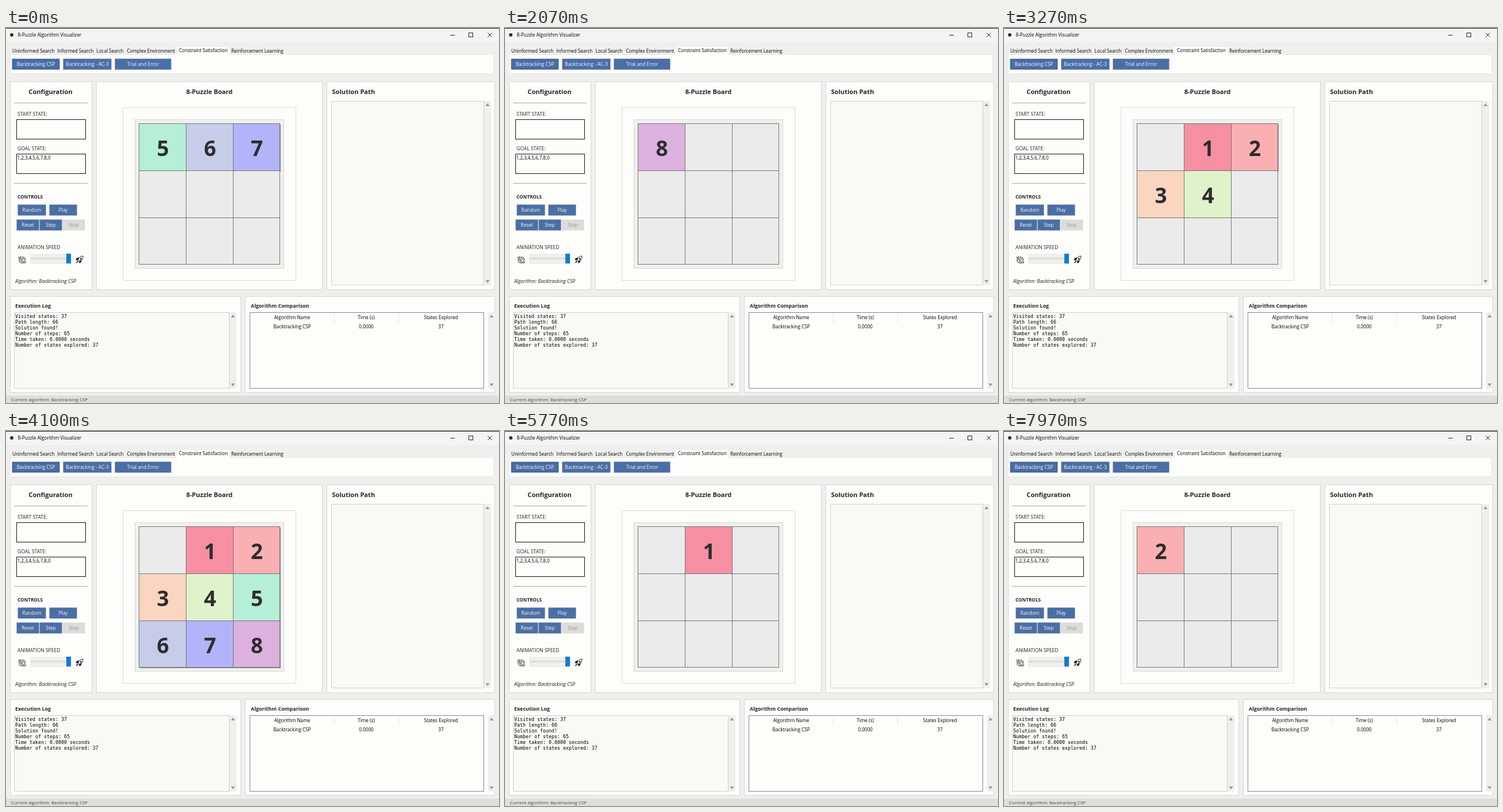
An HTML page with a canvas for the animation above (8 s loop, 858 px wide and 653 px high).

```html
<!DOCTYPE html>
<html lang="en">
<head>
<meta charset="utf-8">
<title>8-Puzzle Algorithm Visualizer</title>
<style>
  html, body { margin: 0; width: 100%; height: 100%; overflow: hidden; background: #efefee; }
  canvas { display: block; }
</style>
</head>
<body>
<canvas id="stage" width="858" height="653"></canvas>
<script>
const ctx = document.getElementById('stage').getContext('2d');
const SANS = '"Open Sans", "Noto Sans", sans-serif';
const MONO = '"DejaVu Sans Mono", monospace';
const BLUE = '#4b6ea4', INK = '#242424', PANEL = '#fdfdfc', EDGE = '#d6d6d0';
const TILE_COLORS = ['', '#f78fa2', '#fab0b3', '#fad6c0', '#e0f2ca', '#b6efd8', '#c7cce9', '#b3b3fa', '#dcb1df'];
const LOOP = 8000;

// Depth-first search: consecutive values are placed, then undone on failure.
function searchStates(starts) {
  const states = [];
  for (const start of starts) {
    const values = [];
    for (let v = start; v <= 8; v++) values.push(v);
    if (start > 0) values.push(0);
    for (let n = 1; n <= values.length; n++) states.push(values.slice(0, n));
    for (let n = values.length - 1; n >= 0; n--) states.push(values.slice(0, n));
  }
  return states;
}

// Every state is held a little longer the more tiles it has to draw.
const states = searchStates([5, 8, 0, 6, 2]).slice(2);
let clock = -90;
const timeline = states.map(values => {
  clock += 185 + 9 * values.filter(Boolean).length;
  return { values, end: clock };
});

function box(x1, y1, x2, y2, fill, stroke) {
  if (fill) { ctx.fillStyle = fill; ctx.fillRect(x1, y1, x2 - x1, y2 - y1); }
  if (stroke) {
    ctx.strokeStyle = stroke;
    ctx.lineWidth = 1;
    ctx.strokeRect(x1 + .5, y1 + .5, x2 - x1 - 1, y2 - y1 - 1);
  }
}

function text(str, x, y, size, { align = 'left', color = '#000', style = '', font = SANS } = {}) {
  ctx.font = `${style} ${size}px ${font}`;
  ctx.textAlign = align;
  ctx.fillStyle = color;
  ctx.fillText(str, x, y);
}

function path(d, color, width = 1, fill) {
  const p = new Path2D(d);
  if (fill) { ctx.fillStyle = fill; ctx.fill(p); }
  if (!color) return;
  ctx.strokeStyle = color;
  ctx.lineWidth = width;
  ctx.stroke(p);
}

function button(label, x1, y1, x2, y2, fill = BLUE, color = '#f8f9fc') {
  box(x1 - .5, y1 - .5, x2 + .5, y2 + .5, fill);
  text(label, (x1 + x2) / 2, (y1 + y2) / 2 + 3, 8.4, { align: 'center', color });
}

function scrollbar(x1, x2, top, bottom) {
  const x = (x1 + x2) / 2;
  box(x1, top, x2, bottom, '#efefee');
  path(`M${x - 3.5} ${top + 9}h7l-3.5 -5z`, null, 0, '#999');
  path(`M${x - 3.5} ${bottom - 9}h7l-3.5 5z`, null, 0, '#999');
}

function drawHeader() {
  box(0, 0, 858, 653, '#efefee');
  box(0, 0, 858, 24, '#f3f4f3');
  box(0, 0, 858, 1, '#1c1c2b');
  path('M13 12a3 3 0 1 1 -6 0a3 3 0 1 1 6 0z', null, 0, '#333');
  text('8-Puzzle Algorithm Visualizer', 20.5, 15, 8.25);
  path('M773 12.5h8', '#222');
  box(805, 8, 813, 16, null, '#222');
  path('M838.5 8.5l7 7m0 -7l-7 7', '#222');

  box(7, 46, 849, 80, PANEL, '#e9e9e6');
  box(297, 33, 389, 47, PANEL);
  [['Uninformed Search', 11], ['Informed Search', 89.5], ['Local Search', 157.5], ['Complex Environment', 210.5],
   ['Constraint Satisfaction', 301, 42], ['Reinforcement Learning', 392]]
    .forEach(([label, x, y = 43]) => text(label, x, y, 8.1));
  button('Backtracking CSP', 11, 54, 93, 72);
  box(12, 55, 92, 71, null, '#3f5f92');
  button('Backtracking - AC-3', 100, 54, 183, 72);
  button('Trial and Error', 190, 54, 287, 72);
}

function drawConfiguration() {
  box(7, 93, 150, 456, PANEL, EDGE);
  text('Configuration', 77.5, 115, 11.1, { align: 'center', style: 'bold', color: INK });
  box(14, 130, 142, 131, '#a8a8a2');
  box(14, 270, 142, 271, '#a8a8a8');
  text('START STATE:', 20, 153, 8.6, { color: INK });
  box(18, 159, 139, 194, PANEL, '#111');
  text('GOAL STATE:', 20, 213, 8.6, { color: INK });
  box(18, 219, 139, 254, PANEL, '#111');
  text('1,2,3,4,5,6,7,8,0', 19.5, 229, 8.2);
  text('CONTROLS', 20, 296.5, 8.2, { style: 'bold', color: INK });
  button('Random', 21, 308, 69, 326);
  button('Play', 76, 308, 123, 326);
  button('Reset', 19, 334, 57, 352);
  button('Step', 59, 334, 97, 352);
  button('Stop', 99, 334, 137, 352, '#dcdcdb', '#969696');
  text('ANIMATION SPEED', 20, 384.5, 8.5, { color: INK });
  box(42, 393, 114, 411, '#efefee');
  box(43, 400, 105, 403, '#dddcd2');
  box(105, 393, 113, 410, '#0f7cd4');
  // Snail and rocket
  path('M33.5 403a4.2 4.2 0 1 0 -8.4 0a4.2 4.2 0 0 0 8.4 0M31.5 403.5a2.2 2.2 0 1 0 -3.4 1.6l1.6 -1.4M22 398l1 3v5q1 3 4 3h7v-3M25.5 397l-1 4', '#222', 1);
  path('M134 397q-6 0 -9 7l3 3q6 -3 6 -10z', '#222', 1);
  path('M127 400l-4 1l-1 3l3.5 0zM131 404l-.5 4l-3 1v-3zM124.5 405.5l-2.5 3.5l3.5 -2z', '#222', .8, '#222');
  path('M129 400.5h2.5v2.5h-2.5z', null, 0, '#222');
  text('Algorithm: Backtracking CSP', 16, 444, 8.6, { style: 'italic', color: INK });
}

function drawBoard(values) {
  box(157, 93, 551, 456, PANEL, EDGE);
  text('8-Puzzle Board', 354, 115, 11.1, { align: 'center', style: 'bold', color: INK });
  box(203, 138, 505, 440, PANEL, '#dcdcd8');
  box(224, 159, 484, 419, '#f0f0ec', '#d9d9d3');
  const edge = i => Math.round(i * 81.8);
  for (let i = 0; i < 9; i++) {
    const col = i % 3, row = (i - col) / 3, value = values[i];
    const x1 = 231 + edge(col), y1 = 166 + edge(row);
    const x2 = 232 + edge(col + 1), y2 = 167 + edge(row + 1);
    if (value) box(x1 + 2, y1 + 2, x2 + 1, y2 + 1, '#8c8c8c');
    box(x1, y1, x2, y2, value ? TILE_COLORS[value] : '#ebebeb', '#747479');
    if (value) text(value, (x1 + x2) / 2 + .5, y1 + 57, 37, { align: 'center', style: 'bold', color: '#2d2d2d' });
  }
}

function drawResults() {
  box(558, 93, 851, 456, PANEL, EDGE);
  text('Solution Path', 567.5, 115, 11.1, { style: 'bold', color: INK });
  box(566, 127, 832, 448, '#f9f9f8', '#cfcfcb');
  scrollbar(832, 844, 127, 448);

  box(7, 467, 409, 635, PANEL, EDGE);
  text('Execution Log', 16, 487, 9, { style: 'bold', color: INK });
  box(14, 495, 389, 628, '#f9f9f8', '#cfcfcb');
  scrollbar(389, 401, 495, 628);
  ['Visited states: 37', 'Path length: 66', 'Solution found!', 'Number of steps: 65',
   'Time taken: 0.0000 seconds', 'Number of states explored: 37']
    .forEach((line, i) => text(line, 16, 505 + 10 * i, 8.3, { font: MONO }));

  box(416, 467, 851, 635, PANEL, EDGE);
  text('Algorithm Comparison', 426, 487, 9, { style: 'bold', color: INK });
  box(424, 495, 832, 628, PANEL, '#82878f');
  box(571, 497, 572, 513, '#e5e5e5');
  box(683, 497, 684, 513, '#e5e5e5');
  [['Algorithm Name', 'Backtracking CSP', 498], ['Time (s)', '0.0000', 627], ['States Explored', '37', 757]]
    .forEach(([head, cell, x]) => {
      text(head, x, 507, 8.2, { align: 'center' });
      text(cell, x, 523, 8.2, { align: 'center' });
    });
  scrollbar(839, 851, 495, 628);

  box(0, 640, 858, 653, '#dededd');
  text('Current algorithm: Backtracking CSP', 8.5, 650, 7.95, { color: '#444' });
}

function frame(now) {
  const t = now % LOOP;
  const current = timeline.find(step => t < step.end) || timeline[timeline.length - 1];
  drawHeader();
  drawConfiguration();
  drawBoard(current.values);
  drawResults();
  requestAnimationFrame(() => frame(performance.now() - begin));
}

const begin = performance.now();
frame(0);
</script>
</body>
</html>
```
